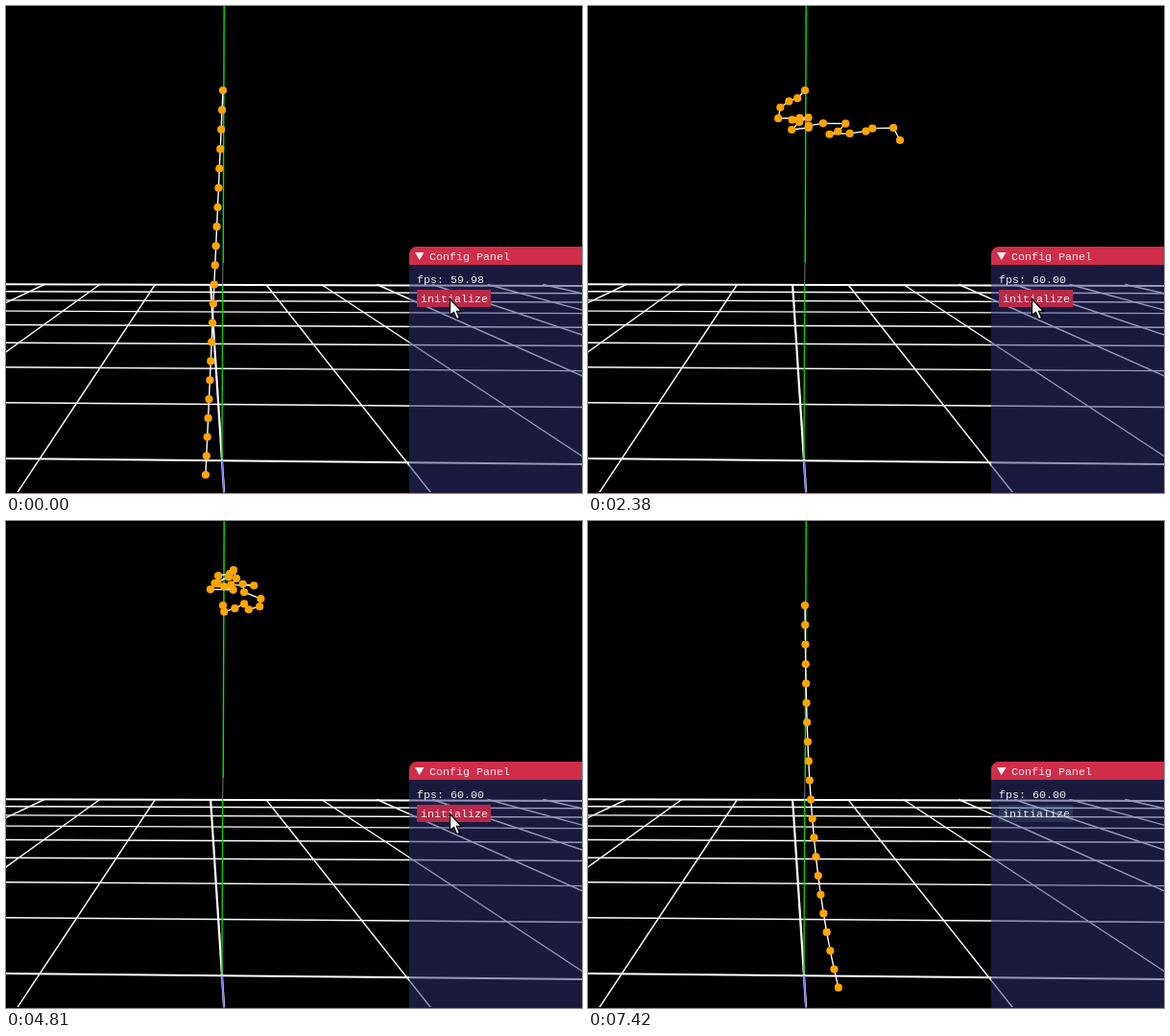
These frames come from a looping animation (600 by 508 pixels, 7.52 s). An HTML page with a canvas:

```html
<!DOCTYPE html>
<html lang="en">
<head>
<meta charset="utf-8">
<title>Rope simulation</title>
<style>
html, body { margin: 0; width: 100%; height: 100%; overflow: hidden; background: #000; }
canvas { display: block; }
</style>
</head>
<body>
<canvas id="stage" width="600" height="508"></canvas>
<script>
const ctx = document.getElementById('stage').getContext('2d');
const LOOP = 7520, TICKS = 84, STEP = 89.4, LAG = 35;
const LINKS = 20, LINK = 20.5, GRAVITY = 2000;
const ANCHOR = { x: 226, y: 88 }, VANISH = { x: 208, y: 211 };
const LEAVE = 57, GONE = 63; // ticks when the pointer moves off

// Each act is one slow swing, bent most at `peak`, with a flick of the free end.
// Acts with a tail begin as a tangle that ends there.
const acts = [
  { from: 0, peak: 2200, period: 8800, bend: -0.155, flick: 1.4, flickAt: 1660 },
  { from: 27, peak: 3480, period: 4100, bend: -0.77, flick: -0.65, flickAt: 3480,
    tail: { x: 325, y: 140 }, seed: 7 },
  { from: 54, peak: 5860, period: 4100, bend: -0.3, flick: 1.2, flickAt: 6350,
    tail: { x: 233, y: 55 }, seed: 3 }
];

const mix = (a, b, u) => a + (b - a) * u;
const wave = (t, period) => Math.cos(2 * Math.PI * t / period);
const pulse = (t, width) => Math.exp(-((t / width) ** 2));

function seeded(seed) {
  return () => {
    seed = (seed * 16807) % 2147483647;
    return seed / 2147483647;
  };
}

// Random walk from the anchor, bent so that it ends at the tail.
function tangle({ tail, seed }) {
  const rand = seeded(seed * 7919), walk = [{ x: 0, y: 0 }];
  for (let n = 0; n < LINKS; n++) {
    const a = rand() * 2 * Math.PI;
    walk.push({ x: walk[n].x + 18 * Math.cos(a), y: walk[n].y + 8 * Math.sin(a) });
  }
  const end = walk[LINKS];
  return walk.map((p, n) => ({
    x: p.x + mix(ANCHOR.x, tail.x - end.x, n / LINKS),
    y: p.y + mix(ANCHOR.y, tail.y - end.y, n / LINKS)
  }));
}
for (const act of acts) if (act.tail) act.start = tangle(act);

function hanging(act, t) {
  const tilt = -0.045 * wave(t, 3250);
  const bend = act.bend * wave(t - act.peak, act.period);
  const flick = act.flick * pulse(t - act.flickAt, 190);
  const depth = 0.04 + 0.15 * pulse(t - act.peak, 700);
  const nodes = [ANCHOR];
  for (let n = 1; n <= LINKS; n++) {
    const s = n / LINKS, len = LINK * (1 - depth * s);
    const angle = tilt + bend * s ** 2 + flick * s ** 8;
    const { x, y } = nodes[n - 1];
    nodes.push({ x: x + len * Math.sin(angle), y: y + len * Math.cos(angle) });
  }
  return nodes;
}

// A tangled node falls freely until the rope above it is taut.
function ropeAt(tick) {
  const act = acts.findLast(a => tick >= a.from);
  const nodes = hanging(act, tick * STEP);
  if (!act.start) return nodes;
  const drop = GRAVITY / 2 * ((tick - act.from) * STEP / 1000) ** 2;
  return nodes.map((p, n) => {
    const q = act.start[n], u = Math.min(1, drop / Math.max(1, p.y - q.y));
    return { x: mix(q.x, p.x, u), y: mix(q.y, p.y, u) };
  });
}

function line(x1, y1, x2, y2, color, width) {
  ctx.strokeStyle = color;
  ctx.lineWidth = width;
  ctx.beginPath();
  ctx.moveTo(x1, y1);
  ctx.lineTo(x2, y2);
  ctx.stroke();
}

function fillPath(points, color) {
  ctx.fillStyle = color;
  ctx.beginPath();
  points.forEach(([x, y]) => ctx.lineTo(x, y));
  ctx.closePath();
  ctx.fill();
}

function drawFloor() {
  for (let k = 0; k <= 8; k++) {
    const depth = 1000 / (3.831 + 1.1 * k), y = VANISH.y + depth;
    line(0, y, 600, y + depth * 0.023, '#fff', k % 8 ? 1.4 : 2);
  }
  for (let j = -3; j <= 6; j++) {
    const slope = 0.0645 + 0.726 * j;
    const xAt = y => VANISH.x + slope * (y - VANISH.y);
    line(xAt(290.5), 290.5, xAt(508), 508, '#fff', j ? 1.4 : 2.2);
  }
  line(0, 507.5, 600, 507.5, '#1c0008', 1);
  line(227.2, 0, 226.2, 268, '#00e600', 1.4);
  line(226, 268, 225.7, 291, '#777', 1);
  line(225.7, 291, 225, 473, '#00d000', 1.4);
  line(225, 474, 227, 508, '#7070ff', 1.5);
}

function drawRope(nodes) {
  ctx.strokeStyle = '#fff';
  ctx.lineWidth = 1.4;
  ctx.beginPath();
  nodes.forEach(p => ctx.lineTo(p.x, p.y));
  ctx.stroke();
  ctx.fillStyle = '#ffa500';
  for (const p of nodes) {
    ctx.beginPath();
    ctx.arc(p.x, p.y, 4.1, 0, 7);
    ctx.fill();
  }
}

function drawPanel(fps, button) {
  ctx.fillStyle = 'rgba(51,51,125,.51)';
  ctx.fillRect(420, 270, 180, 238);
  ctx.fillStyle = '#d02d48';
  ctx.beginPath();
  ctx.roundRect(420, 251, 200, 19, [8, 0, 0, 0]);
  ctx.fill();
  fillPath([[426, 257], [435.5, 257], [430.7, 265]], '#f4f4f4');
  ctx.fillStyle = button;
  ctx.fillRect(428, 296, 77, 18);
  ctx.fillStyle = '#eee';
  ctx.font = '11.67px "Liberation Mono", "DejaVu Sans Mono", monospace';
  ctx.fillText('Config Panel', 441, 265);
  ctx.fillText('fps: ' + fps, 428, 289);
  ctx.fillText('initialize', 432, 309);
}

function drawCursor(x, y) {
  const shape = [[0, 0], [0, 17], [4, 14], [7, 21], [10, 20], [7, 13], [12, 13]]
    .map(([dx, dy]) => [x + dx, y + dy]);
  fillPath(shape, '#fff');
  ctx.strokeStyle = '#000';
  ctx.lineWidth = 1.3;
  ctx.stroke();
}

function draw(ms) {
  const tick = Math.min(TICKS - 1, Math.floor((ms + LAG) / STEP));
  const drift = tick * 2 % 7;
  const fps = drift === 0 ? '59.98' : drift < 3 ? '60.02' : '60.00';
  const pressed = acts.some(a => a.tail && tick === a.from - 1);
  const button = tick > LEAVE ? 'rgba(120,196,212,.14)' : pressed ? '#d02d48' : '#b92948';
  ctx.fillStyle = '#000';
  ctx.fillRect(0, 0, 600, 508);
  drawFloor();
  drawRope(ropeAt(tick));
  drawPanel(fps, button);
  if (tick < GONE) {
    const u = Math.max(0, tick - LEAVE) / (GONE - 1 - LEAVE);
    drawCursor(mix(462.5, 555.5, u), mix(305.5, 498.5, u));
  }
}

const start = performance.now();
function loop() {
  draw((performance.now() - start) % LOOP);
  requestAnimationFrame(loop);
}
loop();
</script>
</body>
</html>
```
